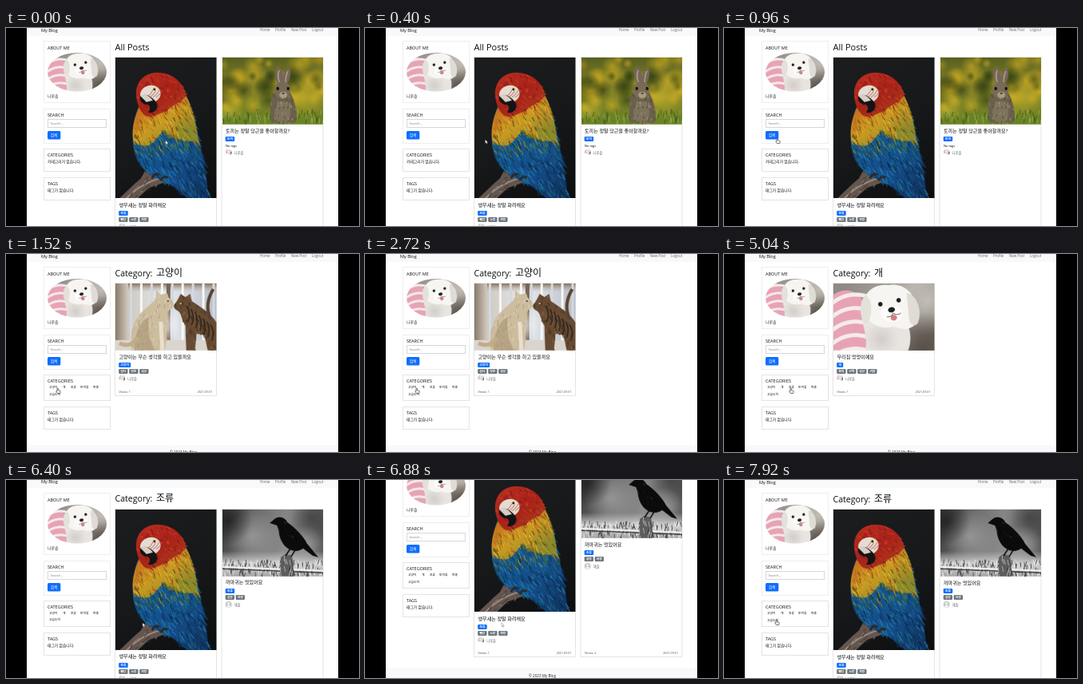
These frames come from a looping animation (442 by 248 pixels, 8 s). An HTML page with a canvas:

```html
<!DOCTYPE html>
<html lang="ko">
<head>
<meta charset="utf-8">
<title>My Blog</title>
<style>
html, body { margin: 0; width: 100%; height: 100%; overflow: hidden; background: #000; }
canvas { display: block; width: 442px; height: 248px; }
</style>
</head>
<body>
<canvas id="stage"></canvas>
<script>
const W = 442, H = 248, LOOP = 8000, ART = 2;
const FONT = '"Open Sans", "Noto Sans CJK KR", "Noto Sans CJK", "Noto Sans", sans-serif';
const OWNER = '나루솔', GUEST = '해솔';
const INK = '#0c0e10';
const canvas = document.getElementById('stage');
const dpr = window.devicePixelRatio || 1;
canvas.width = W * dpr;
canvas.height = H * dpr;
const screen2d = canvas.getContext('2d');
let g = screen2d;

function rect(x, y, w, h, color) {
  g.fillStyle = color;
  g.fillRect(x, y, w, h);
}

function pill(x, y, w, h, r, color) {
  g.fillStyle = color;
  g.beginPath();
  g.roundRect(x, y, w, h, r);
  g.fill();
}

function frame(x, y, w, h, color = '#e4e4e4') {
  g.strokeStyle = color;
  g.lineWidth = 1;
  g.strokeRect(x + .5, y + .5, w - 1, h - 1);
}

function text(s, x, y, size, color = INK, align = 'left', weight = 400) {
  g.font = `${weight} ${size}px ${FONT}`;
  g.textAlign = align;
  g.fillStyle = color;
  g.fillText(s, x, y);
}

function shape(d, color) {
  g.fillStyle = color;
  g.fill(new Path2D(d));
}

function line(d, color, width) {
  g.strokeStyle = color;
  g.lineWidth = width;
  g.stroke(new Path2D(d));
}

function oval(x, y, rx, ry, color, turn = 0) {
  g.fillStyle = color;
  g.beginPath();
  g.ellipse(x, y, rx, ry, turn, 0, 7);
  g.fill();
}

function fade(x0, y0, x1, y1, ...colors) {
  const f = g.createLinearGradient(x0, y0, x1, y1);
  colors.forEach((c, i) => f.addColorStop(i / (colors.length - 1), c));
  return f;
}

function glow(x, y, r, rgb, alpha) {
  const f = g.createRadialGradient(x, y, 0, x, y, r);
  f.addColorStop(0, `rgba(${rgb},${alpha})`);
  f.addColorStop(1, `rgba(${rgb},0)`);
  g.fillStyle = f;
  g.fillRect(x - r, y - r, 2 * r, 2 * r);
}

function random(seed) {
  return () => (seed = seed * 16807 % 2147483647) / 2147483647;
}

// Short strokes that start inside a path and leave a ragged edge
function tufts(d, seed, count, colors, len, angle) {
  const rnd = random(seed), path = new Path2D(d);
  g.lineWidth = .9;
  for (let i = 0; i < count; i++) {
    const x = rnd() * 127, y = rnd() * 177, a = angle + (rnd() - .5) * .7;
    g.strokeStyle = colors[Math.floor(rnd() * colors.length)];
    if (!g.isPointInPath(path, x * ART, y * ART)) continue;
    g.beginPath();
    g.moveTo(x, y);
    g.lineTo(x + len * Math.cos(a), y + len * Math.sin(a));
    g.stroke();
  }
}

// Pictures are painted in a box 127 wide
function dog() {
  rect(0, 0, 127, 84, fade(20, 0, 110, 84, '#8f8a84', '#b3aea6', '#6f675f'));
  glow(118, 22, 42, '205,201,194', .8);
  glow(112, 80, 44, '82,74,68', .8);
  shape('M0 14C12 6 26 6 36 20L44 48L48 84H0Z', '#e7a3b4');
  for (let i = 0; i < 5; i++) {
    const y = 16 + i * 17;
    line(`M-2 ${y + 9}Q18 ${y - 7} 42 ${y}`, '#f5ecec', 5);
  }
  shape('M34 34C50 48 80 54 92 50C98 60 98 74 94 84H40C44 68 36 52 34 34Z', '#e8e5e1');
  glow(60, 70, 22, '196,190,186', .6);
  shape('M38 24C40 8 54 0 70 2C86 -1 100 10 103 25C108 40 106 52 98 55C90 60 82 55 75 54C62 58 48 52 43 44C38 38 36 31 38 24Z', '#f7f5f2');
  shape('M41 14C32 22 32 40 40 50C48 48 49 31 46 21Z', '#e4e0da');
  shape('M92 12C106 14 112 36 106 50C102 55 96 52 95 44Z', '#dfdbd5');
  oval(73, 38, 14, 10, '#fdfcfa');
  oval(59, 26, 2.8, 2.9, '#1d1817');
  oval(82, 21, 2.8, 2.9, '#1d1817');
  oval(73, 33, 4.4, 3.3, '#1f1d1f', -.2);
  oval(76, 43, 4, 3.6, '#cf7f86', -.2);
  line('M75 37Q74 42 67 42M75 37Q80 41 85 37', '#7d6d68', 1);
}

const PLUMAGE = 'M29 62C20 84 19 108 27 128C36 146 52 152 66 158C76 165 84 170 90 177H117C116 156 112 134 107 112C102 86 95 62 84 42Z';
const CHEST = 'M29 64C21 82 20 98 24 110C34 108 40 116 50 104L60 92C74 108 92 104 104 106C102 80 96 58 84 40L68 56Z';
const GREEN = 'M23 102C34 104 40 110 50 100L60 90C72 104 92 98 103 98L106 112C90 122 74 112 62 116C48 126 36 118 25 122Z';
const HEAD = 'M26 48C25 29 38 18 55 19C73 20 86 32 89 48C82 58 72 58 64 68C56 68 46 79 36 72C29 65 27 56 26 48Z';

function parrot() {
  rect(0, 0, 127, 177, fade(0, 0, 127, 177, '#1b1d1f', '#17191b', '#0d0e10'));
  shape('M5 177L25 158L32 152L38 141L44 148L64 146L70 154L42 164L28 177Z', '#64564e');
  line('M14 177Q34 156 64 150', '#a3968b', 1.6);
  tufts('M8 177L36 148L68 148L30 177Z', 5, 500, ['#3b322d', '#8d8077'], 4, 2.5);
  shape(PLUMAGE, fade(30, 100, 112, 177, '#15568a', '#14508c', '#10315c'));
  tufts(PLUMAGE, 11, 1300, ['#2580b8', '#0c2747', '#1b6a86', '#164f93', '#0f3a66'], 8, 1.05);
  shape(CHEST, fade(35, 62, 70, 108, '#c9701f', '#c99a22', '#8a8b2c'));
  tufts(CHEST, 29, 1200, ['#e5b530', '#a9741a', '#7d7a22', '#c6521f', '#d9a11f', '#5d4a18'], 6, 1.05);
  tufts(GREEN, 41, 1100, ['#5f7c34', '#1f5d58', '#a8932a', '#2c5b34', '#1a4f6c'], 7, 1.05);
  shape(HEAD, fade(35, 20, 75, 75, '#b82d20', '#a82219', '#a93b1d'));
  tufts(HEAD, 53, 900, ['#d4402a', '#7c1714', '#bd3020', '#96251a'], 4, .8);
  oval(44, 46, 13, 11, '#e6dbd3', -.25);
  for (let i = 0; i < 4; i++) line(`M${39 + i * 4} 50q5 -3 8 -9`, '#b0564e', .7);
  shape('M31 49C37 43 47 50 52 57C55 65 48 71 41 69C46 63 42 58 37 59C34 57 30 55 31 49Z', '#141315');
  shape('M31 48C36 44 44 49 47 54L39 56Z', '#d8cfc4');
  oval(49, 40, 2.4, 2.4, '#ded384');
  oval(49, 40, 1.4, 1.4, '#171514');
  line('M46 152q3 -7 9 -5M57 155q3 -7 9 -4', '#2b2929', 3);
}

function rabbit() {
  rect(0, 0, 127, 84, fade(0, 0, 0, 84, '#586021', '#8a8627', '#5f7a22'));
  const rnd = random(77);
  for (let i = 0; i < 46; i++) {
    const x = rnd() * 127, y = rnd() * 62, r = 6 + rnd() * 11;
    glow(x, y, r, rnd() < .5 ? '40,56,18' : '212,176,32', .6);
  }
  glow(104, 50, 30, '211,183,42', .6);
  glow(8, 67, 22, '224,193,45', .6);
  rect(0, 67, 127, 17, fade(0, 66, 0, 84, 'rgba(110,137,40,0)', '#688426'));
  for (let i = 0; i < 90; i++) {
    const x = rnd() * 127, y = 70 + rnd() * 15;
    line(`M${x} ${y}l${rnd() * 3 - 1.5} -6`, rnd() < .5 ? '#9aa94a' : '#3c551c', .8);
  }
  const body = 'M64 45C61 54 59 66 62 82H92C96 68 91 53 85 43Z';
  shape(body, '#6a604d');
  oval(76, 69, 10, 14, '#7d725a');
  shape('M71 34C65 25 67 14 71 11C77 16 78 27 77 34ZM77 34C76 24 79 14 84 12C88 19 85 29 81 35Z', '#75665a');
  line('M72 31Q69 22 72 16M80 31Q80 22 83 17', '#b39b88', 1.6);
  oval(76, 41, 10, 11, '#776b56');
  tufts(body, 31, 700, ['#4f4636', '#93876d', '#a4977c'], 3, 1.6);
  oval(70, 39, 1.6, 2, '#100d0a');
  oval(83, 39, 1.6, 2, '#100d0a');
  oval(77, 47, 5, 4, '#a89b80');
  oval(77, 45, 1.6, 1, '#463a31');
}

function crow() {
  rect(0, 0, 127, 84, fade(0, 0, 127, 30, '#3c3c3c', '#6c6c6c', '#8c8c8c', '#565656'));
  glow(38, 34, 34, '165,165,165', .7);
  glow(8, 14, 30, '22,22,22', .7);
  glow(112, 10, 32, '46,46,46', .6);
  glow(104, 46, 26, '178,178,178', .7);
  rect(0, 52, 127, 32, fade(0, 52, 0, 84, 'rgba(200,200,200,0)', '#d2d2d2', '#a4a4a4'));
  const rnd = random(19);
  for (let i = 0; i < 190; i++) {
    const x = rnd() * 127, y = 68 + rnd() * 18;
    line(`M${x} ${y}l${rnd() * 4 - 2} -6`, rnd() < .5 ? '#3c3c3c' : '#ececec', .8);
  }
  line('M0 72L127 77', '#efefef', 2.2);
  line('M0 74.5L127 79.5', '#2f2f2f', 1.2);
  const post = 'M73 84L74 60L79 56L88 58L91 84Z';
  shape(post, '#5c5c5c');
  tufts(post, 23, 700, ['#2b2b2b', '#b0b0b0'], 7, 1.57);
  const body = 'M60 17L66 12C70 8 79 9 82 16C92 23 102 33 107 43L121 60L114 58L102 49C92 56 80 50 75 40C71 33 72 26 69 20Z';
  shape(body, '#0b0b0b');
  tufts(body, 61, 260, ['#050505', '#303030', '#191919'], 4, .9);
  line('M86 49L80 58M92 51L87 59', '#0f0f0f', 1.6);
}

function cats() {
  rect(0, 0, 127, 84, fade(0, 0, 127, 0, '#c7beb2', '#e6e9ee', '#b9c0cb'));
  rect(0, 0, 127, 10, fade(0, 0, 0, 10, '#86715d', 'rgba(190,180,168,.1)'));
  rect(0, 0, 16, 84, fade(0, 0, 16, 0, '#897b6b', '#d2c9bd'));
  for (let x = 18; x < 127; x += 13) rect(x, 0, 3, 72, x % 2 ? '#f7f7f4' : '#d2d8df');
  rect(64, 0, 5, 73, '#756554');
  rect(0, 71, 127, 13, '#d9d5ce');
  glow(58, 52, 24, '255,255,255', .9);
  const pale = 'M20 84C18 60 24 44 34 35C43 26 48 24 51 17L51 8L57 14L65 12L67 18C75 23 75 30 67 34C64 48 66 68 62 84Z';
  shape(pale, '#cdbd9f');
  tufts(pale, 13, 700, ['#b09c78', '#dfd2b8', '#c2ae8a'], 4, 1.7);
  shape('M24 84C23 66 30 48 42 42C40 58 43 71 50 84Z', 'rgba(160,140,108,.5)');
  line('M28 67Q20 82 5 75', '#c1ac89', 5);
  line('M57 48L59 84', '#eadfca', 5);
  oval(66, 22, 1.2, 1, '#52472d');
  const tabby = 'M76 24L79 19L82 13L88 17L94 13L96 22C106 29 120 37 127 49V84H116L112 65L102 63L100 84H89L88 53C82 44 84 38 78 34C73 32 72 27 76 24Z';
  shape(tabby, '#664a32');
  tufts(tabby, 17, 700, ['#3a2a1d', '#8a6a4a', '#4d3825'], 4, 1.2);
  for (let i = 0; i < 7; i++) line(`M${90 + i * 5} ${28 + i * 4}q5 10 1 20`, '#2c2119', 1.5);
  line('M120 45Q111 27 123 7', '#594330', 4);
  oval(82, 25, 1.2, 1, '#d3bd62');
}

const arts = new Map();

function art(paint) {
  if (!arts.has(paint)) {
    const sheet = document.createElement('canvas'), back = g;
    sheet.width = 127 * ART;
    sheet.height = 177 * ART;
    g = sheet.getContext('2d');
    g.scale(ART, ART);
    paint();
    g = back;
    arts.set(paint, sheet);
  }
  return arts.get(paint);
}

function photo(paint, x, y, w, h, round = false) {
  const sheet = art(paint);
  g.save();
  g.beginPath();
  if (round) g.ellipse(x + w / 2, y + h / 2, w / 2, h / 2, 0, 0, 7);
  else g.rect(x, y, w, h);
  g.clip();
  g.imageSmoothingQuality = 'high';
  g.drawImage(sheet, x, y, w, w * 177 / 127);
  g.restore();
}

const POSTS = {
  parrot: { paint: parrot, tall: 177, title: '앵무새는 정말 화려해요', kind: '조류', tags: ['빨강', '노랑', '파랑'], by: OWNER, views: 1 },
  rabbit: { paint: rabbit, tall: 84, title: '토끼는 정말 당근을 좋아할까요?', kind: '토끼', tags: [], by: OWNER, views: 3 },
  crow: { paint: crow, tall: 84, title: '까마귀는 멋있어요', kind: '조류', tags: ['검정', '야생'], by: GUEST, views: 2 },
  cat: { paint: cats, tall: 84, title: '고양이는 무슨 생각을 하고 있을까요', kind: '고양이', tags: ['집사', '창문', '일상'], by: OWNER, views: 1 },
  dog: { paint: dog, tall: 84, title: '우리집 멍멍이예요', kind: '개', tags: ['흰색', '산책', '일상', '귀염'], by: OWNER, views: 1 }
};

const PAGES = [
  { until: 1440, posts: ['parrot', 'rabbit'], end: 270, foot: 284 },
  { until: 3840, name: '고양이', posts: ['cat'], end: 178, foot: 239 },
  { until: 5520, name: '개', posts: ['dog'], end: 178, foot: 239 },
  { until: LOOP, name: '조류', posts: ['parrot', 'crow'], end: 270, foot: 284 }
];

function badge(s, x, y, w, color) {
  pill(x, y, w, 6, 1.2, color);
  text(s, x + w / 2, y + 4.4, 3.7, '#fff', 'center', 700);
}

function card(post, x, end) {
  const y = 37 + post.tall, left = x + 4.5;
  frame(x - 1, 36, 128, end - 36);
  photo(post.paint, x, 37, 126.5, post.tall);
  text(post.title, left, y + 9.5, 6.1);
  badge(post.kind, left - .3, y + 15, post.kind.length * 3.5 + 4.5, '#0d6efd');
  post.tags.forEach((tag, i) => badge(tag, left - .3 + i * 13, y + 23, 11.3, '#6c757d'));
  if (!post.tags.length) text('No tags', left, y + 27.5, 4);
  if (post.by === OWNER) photo(dog, left - .3, y + 31, 8, 8, true);
  else {
    oval(left + 3.7, y + 35, 4, 4, '#c8c8c8');
    oval(left + 3.7, y + 33.7, 1.4, 1.5, '#f5f5f5');
    oval(left + 3.7, y + 37.2, 2.5, 1.5, '#f5f5f5');
  }
  text(post.by, left + 10.8, y + 36.7, 4.2, '#5c6166');
  text('Views: ' + post.views, left, end - 4.3, 3.9, '#4a5056');
  text('2021.09.01', x + 121.5, end - 4.3, 3.7, '#4a5056', 'right');
}

function sidebar(listed) {
  const grow = listed ? 4 : 0;
  frame(47, 16, 84, 78, '#eee');
  text('ABOUT ME', 52, 27, 5.5);
  photo(dog, 52, 31, 74, 48.5, true);
  text(OWNER, 52, 86.7, 4.9, '#333');

  frame(47, 101, 84, 44, '#eee');
  text('SEARCH', 52, 111, 5.5);
  frame(52, 114, 74, 11, '#d3d8dd');
  text('Search...', 55.5, 121, 4.2, '#7d848b');
  pill(52, 129, 16.3, 10.5, 1.5, '#0d6efd');
  text('검색', 60.1, 136, 4.8, '#fff', 'center');

  frame(47, 151, 84, 29 + grow);
  text('CATEGORIES', 52, 161, 5.5);
  if (listed) {
    const at = [54, 71, 81, 93, 109];
    ['고양이', '개', '조류', '토끼류', '파충'].forEach((s, i) => text(s, at[i], 168.4, 3.8, INK, 'left', 500));
    text('고슴도치', 54, 176.5, 3.8, INK, 'left', 500);
  } else text('카테고리가 없습니다.', 52, 169, 4.8);

  frame(47, 187 + grow, 84, 29);
  text('TAGS', 52, 197 + grow, 5.5);
  text('태그가 없습니다.', 52, 205 + grow, 4.8);
}

function drawPage(page) {
  rect(26, 0, 390, 10, '#f8f9fa');
  text('My Blog', 44, 4.5, 5.6);
  [['Home', 318], ['Profile', 337], ['New Post', 357], ['Logout', 383]]
    .forEach(([s, x]) => text(s, x, 3.7, 4.4, '#666'));
  sidebar(!!page.name);
  if (page.name) {
    text('Category:', 136.5, 27.5, 10.6);
    text(page.name, 188, 27.5, 12);
  } else text('All Posts', 136.5, 27.5, 11);
  page.posts.forEach((id, i) => card(POSTS[id], 137 + i * 133.5, page.end));
  rect(26, page.foot, 390, 60, '#f8f9fa');
  text('© 2023 My Blog', 222, page.foot + 11, 4.6, '#222', 'center');
}

const PATH = [
  [0, 200, 141], [80, 200, 141], [860, 66, 138], [1000, 66, 138], [1300, 64, 168],
  [3340, 64, 168], [3520, 72, 168], [4240, 72, 168], [4480, 81, 168], [4940, 81, 168],
  [5040, 83, 168], [5600, 83, 168], [6260, 171, 179], [7200, 171, 179], [7680, 90, 175],
  [7900, 65, 175], [LOOP, 65, 175]
];
const SCROLL = [[0, 0], [6400, 0], [6700, 48], [6920, 48], [7220, 0], [LOOP, 0]];

function along(keys, t, col = 1) {
  const i = keys.findIndex(k => k[0] > t);
  const a = keys[i - 1], b = keys[i], p = (t - a[0]) / (b[0] - a[0]);
  return a[col] + (b[col] - a[col]) * p * p * (3 - 2 * p);
}

function pointer(x, y) {
  g.save();
  g.translate(x, y);
  const hand = x < 92 && y > 136;
  const d = hand
    ? 'M0 0.5Q.8 -.6 1.4 .5V2.7L3.8 3.3Q4.5 3.6 4.2 4.7L3.6 6.6H.6L-1.3 4.1Q-1.2 3.3 0 3.9Z'
    : 'M0 0V4.6L1.1 3.6L1.9 5.3L2.6 5L1.9 3.3H3.3Z';
  shape(d, '#fff');
  line(d, hand ? '#111' : '#555', hand ? .6 : .35);
  g.restore();
}

function draw(now) {
  const t = now % LOOP;
  g.setTransform(dpr, 0, 0, dpr, 0, 0);
  rect(0, 0, W, H, '#000');
  rect(26, 0, 390, H, '#fff');
  g.save();
  g.beginPath();
  g.rect(26, 0, 390, H);
  g.clip();
  g.translate(0, -along(SCROLL, t));
  drawPage(PAGES.find(p => t < p.until));
  g.restore();
  pointer(along(PATH, t), along(PATH, t, 2));
}

const start = performance.now();
function tick() {
  draw(performance.now() - start);
  requestAnimationFrame(tick);
}
tick();
</script>
</body>
</html>
```
